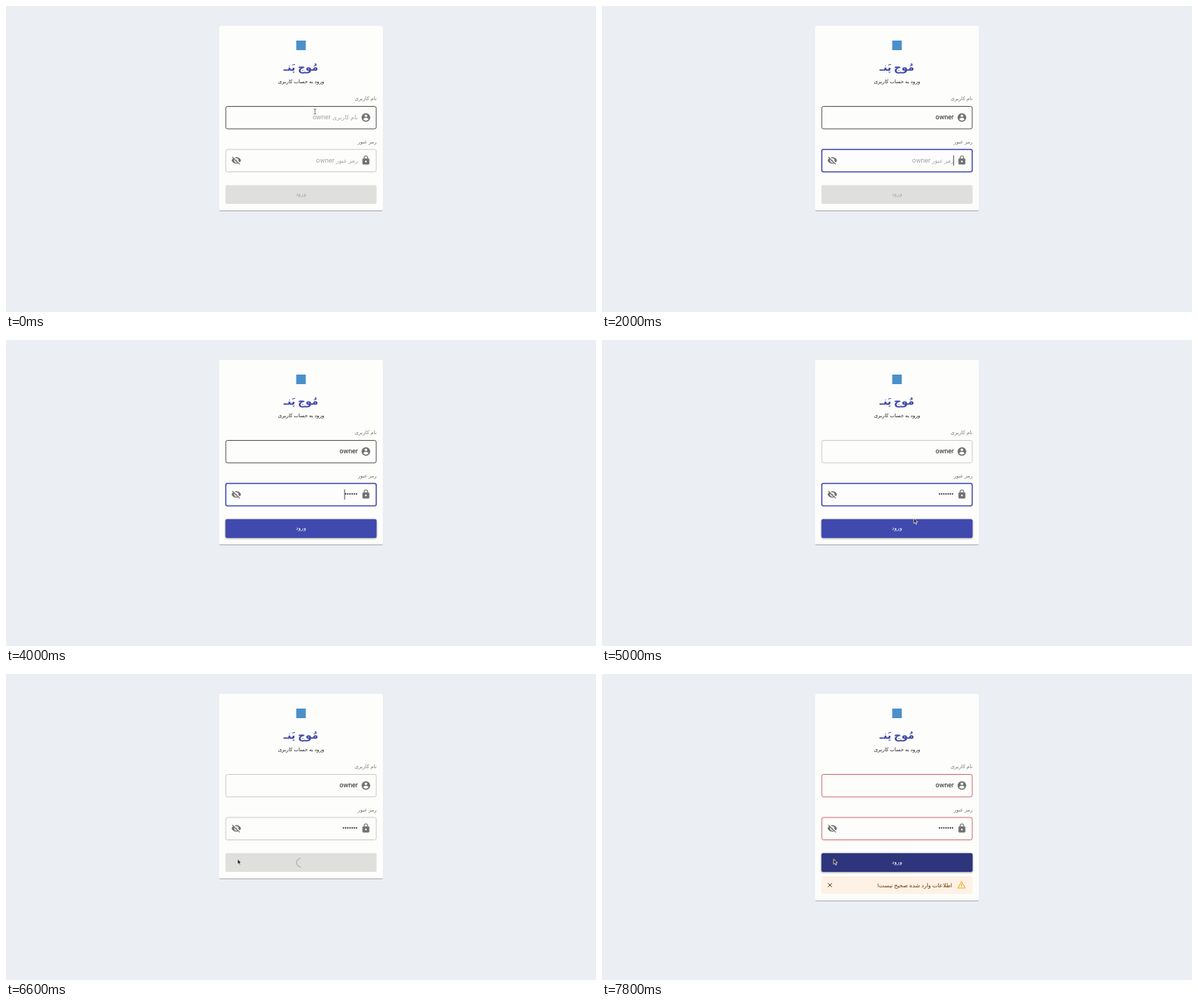
Write an HTML page that moves like this. It is 800 px wide and 416 px high and loops after 8 s.

```html
<!DOCTYPE html>
<html lang="fa">
<head>
<meta charset="utf-8">
<title>ورود</title>
<style>
html, body { margin: 0; width: 100%; height: 100%; overflow: hidden; background: #ebeef3; }
svg { display: block; }
text { font-family: Roboto, "DejaVu Sans", sans-serif; direction: rtl; }
.mid { text-anchor: middle; }
.label { font-size: 6.9px; fill: #757575; }
.value { font-size: 9px; fill: #1c1c1c; }
.hint { font-size: 8px; fill: #a3a3a3; }
.hint tspan { font-size: 9px; }
.icon { fill: #707070; }
.box { fill: none; }
</style>
</head>
<body>
<svg width="800" height="416" viewBox="0 0 800 416">
  <defs>
    <filter id="cardShadow"><feDropShadow dx="0" dy=".8" stdDeviation=".7" flood-opacity=".36"/></filter>
    <filter id="buttonShadow"><feDropShadow dx="0" dy="1" stdDeviation="1" flood-opacity=".4"/></filter>
  </defs>
  <rect id="card" x="289" y="27" width="222" rx="2" fill="#fdfdfc" filter="url(#cardShadow)"/>
  <rect x="393.5" y="47" width="13" height="13" fill="#4a90cb"/>
  <text class="mid" x="400" y="87.5" font-size="14" font-weight="700" fill="#3f48a8">مُوج پَنـ</text>
  <text class="mid" x="400" y="105" font-size="6.9" fill="#222">ورود به حساب کاربری</text>

  <text class="label" x="502.5" y="128">نام کاربری</text>
  <rect id="userBox" class="box" x="298" y="136.500" width="204" height="30.500" rx="2.300"/>
  <text id="userHint" class="hint" x="477" y="154.300">نام کاربری <tspan>owner</tspan></text>
  <text id="user" class="value" x="477" y="154.300"></text>
  <g class="icon" transform="translate(481 144.600) scale(.5833)">
    <circle cx="12" cy="12" r="10"/>
    <g fill="#fdfdfc"><circle cx="12" cy="8" r="3"/><path d="M6 16c0-2 4-3.100 6-3.100s6 1.100 6 3.100c-1.300 2-3.500 3.200-6 3.200S7.300 18 6 16Z"/></g>
  </g>

  <text class="label" x="502.5" y="186.500">رمز عبور</text>
  <rect id="passBox" class="box" x="298" y="195" width="204" height="30.500" rx="2.300"/>
  <text id="passHint" class="hint" x="477" y="212.800">رمز عبور <tspan>owner</tspan></text>
  <g id="dots" fill="#1c1c1c"></g>
  <g class="icon" transform="translate(481 202.600) scale(.5833)">
    <rect x="4" y="8" width="16" height="14" rx="2"/>
    <path d="M8 9V6a4 4 0 0 1 8 0v3" fill="none" stroke="#707070" stroke-width="2"/>
    <circle cx="12" cy="15" r="2" fill="#fdfdfc"/>
  </g>
  <g class="icon" transform="translate(305.300 203) scale(.5833)">
    <path d="M1 12c1.700-4.400 6-7.500 11-7.500s9.300 3.100 11 7.500c-1.700 4.400-6 7.500-11 7.500S2.700 16.400 1 12Z"/>
    <circle cx="12" cy="12" r="5" fill="#fdfdfc"/><circle cx="12" cy="12" r="3"/>
    <path d="M4 2 22 20" stroke="#fdfdfc" stroke-width="2.500"/><path d="M2.600 3.600 20.400 21.400" stroke="#707070" stroke-width="1.800"/>
  </g>
  <rect id="caret" width=".8" height="14" fill="#222"/>

  <rect id="button" x="297.500" y="243.500" width="205" height="25.500" rx="2"/>
  <text id="buttonText" class="mid" x="400" y="258.300" font-size="7.300" font-weight="500">ورود</text>
  <circle id="spinner" cx="400" cy="256.500" r="6" fill="none" stroke="#a9a9a9" stroke-width="1.100" pathLength="126.900"/>

  <g id="alert">
    <rect x="297.500" y="275" width="205" height="24" rx="2" fill="#fdf2e5"/>
    <path d="M487.500 282.300 492.400 291H482.600Z" fill="none" stroke="#f0ae2c" stroke-width="1.100"/>
    <path d="M487.500 285.300v2.700m0 .8v1" stroke="#f0ae2c" stroke-width="1.100"/>
    <text x="475" y="289.500" font-size="7.700" fill="#663c00">اطلاعات وارد شده صحیح نیست!</text>
    <path d="m306.400 284.400 5.200 5.200m0-5.200-5.200 5.200" stroke="#5a3a10" stroke-width="1"/>
  </g>

  <g id="pointer">
    <path id="beam" d="M-1.700-3.500Q0-3.500 0-2.500 0-3.500 1.700-3.500M0-2.500v5M-1.700 3.500Q0 3.500 0 2.500 0 3.500 1.700 3.500" fill="none" stroke="#555" stroke-width=".8"/>
    <path id="hand" d="M-.8.500q.8-1 1.600 0V4l3.500.8q1 .4.800 1.600L4.300 9.500H0L-2.800 6q.2-1.200 2 0Z" fill="#fff" stroke="#222" stroke-width=".6"/>
    <path id="arrow" d="M0 0v7.200l1.700-1.500L2.900 8.400l1.300-.6L3 5.200h2.200Z" fill="#222" stroke="#fff" stroke-width=".7"/>
  </g>
</svg>
<script>
const LOOP = 8000, STEP = 200;
const CLICK = 5400, LOAD = 5600, SPIN_START = 5570, FAIL = 7000;
const NAME = "owner";
// [time, characters entered]
const userKeys = [[200, 0], [800, 1], [1000, 2], [1200, 3], [1400, 4], [1600, 5]];
const passKeys = [[2000, 0], [2400, 1], [2600, 2], [3600, 3], [3800, 5], [4000, 6], [4200, 7]];
// [time, x, y]
const path = [[0, 419, 143.5], [4400, 419, 143.5], [5200, 423.5, 260.5], [5800, 423.5, 260.5], [6600, 314, 251.5], [8000, 314, 251.5]];

const $ = id => document.getElementById(id);
const set = (id, attrs) => { for (const key in attrs) $(id).setAttribute(key, attrs[key]); };
const show = (id, on) => { $(id).style.display = on ? "" : "none"; };
const lastKey = (keys, t) => keys.filter(key => key[0] <= t).pop() || [0, 0];
const smooth = p => p * p * (3 - 2 * p);
const mix = (a, b, p) => a + (b - a) * p;

$("dots").innerHTML = Array.from({ length: 7 }, (_, i) =>
  `<circle cx="${475.3 - i * 2.95}" cy="209.3" r=".95"/>`).join("");

function pointerAt(t) {
  const i = path.findIndex((point, n) => n && t <= point[0]);
  const [a, b] = [path[i - 1], path[i]];
  const p = smooth((t - a[0]) / (b[0] - a[0]));
  return [mix(a[1], b[1], p), mix(a[2], b[2], p)];
}

function drawBox(id, focused, hovered, failed) {
  set(id, {
    stroke: failed ? "#cc5560" : focused ? "#3f48ae" : hovered ? "#3c3c3c" : "#c4c4c4",
    "stroke-width": focused ? 1.5 : 0.9
  });
}

function drawSpinner(t) {
  const phase = Math.max(0, t - SPIN_START) / 1400 % 1;
  const p = smooth(phase * 2 % 1);
  const [dash, offset] = phase < 0.5 ? [mix(1, 100, p), mix(0, -15, p)] : [100, mix(-15, -125, p)];
  set("spinner", {
    "stroke-dasharray": `${dash} 200`,
    "stroke-dashoffset": offset,
    transform: `rotate(${phase * 360} 400 256.5)`
  });
}

function drawCaret(t, inUser, inPass, userTime, passTime, dots) {
  const since = t - (inUser ? userTime : passTime);
  show("caret", (inUser || inPass) && since % 1000 < 500);
  const width = inUser ? $("user").getComputedTextLength() : dots * 2.95;
  set("caret", { x: 476.4 - width, y: inUser ? 145 : 203 });
}

function draw(t) {
  const [userTime, letters] = lastKey(userKeys, t);
  const [passTime, dots] = lastKey(passKeys, t);
  const inUser = t >= 200 && t < 2000, inPass = t >= 2000 && t < CLICK;
  const failed = t >= FAIL, loading = t >= LOAD && !failed;
  const [x, y] = pointerAt(t);
  const overButton = x > 298 && y > 244 && y < 269;

  $("user").textContent = NAME.slice(0, letters);
  show("userHint", !letters);
  show("passHint", !dots);
  [...$("dots").children].forEach((dot, i) => { dot.style.display = i < dots ? "" : "none"; });
  drawBox("userBox", inUser, y < 167, failed);
  drawBox("passBox", inPass, y > 195 && y < 226, failed);
  drawCaret(t, inUser, inPass, userTime, passTime, dots);

  const disabled = !dots || loading && t > LOAD;
  set("button", {
    fill: disabled ? "#dfdfde" : overButton ? "#2e357d" : "#3f48ae",
    filter: disabled ? "none" : "url(#buttonShadow)"
  });
  set("buttonText", { fill: disabled ? "#a6a6a6" : "#fff" });
  show("buttonText", !loading);
  show("spinner", loading && t > LOAD);
  drawSpinner(t);

  const open = failed ? Math.min(1, (t - FAIL + STEP) / 400) : 0;
  set("card", { height: 251 + 30 * open });
  show("alert", failed);
  set("alert", { opacity: open });

  show("pointer", t < 1400 || t >= 4600);
  set("pointer", { transform: `translate(${x} ${y})` });
  const inField = y < 167 || y > 195 && y < 226;
  const isHand = overButton && t <= LOAD;
  show("beam", inField);
  show("hand", isHand);
  show("arrow", !inField && !isHand);
}

function tick(now) {
  draw(Math.floor(now % LOOP / STEP) * STEP);
  requestAnimationFrame(tick);
}
draw(0);
requestAnimationFrame(tick);
</script>
</body>
</html>
```
